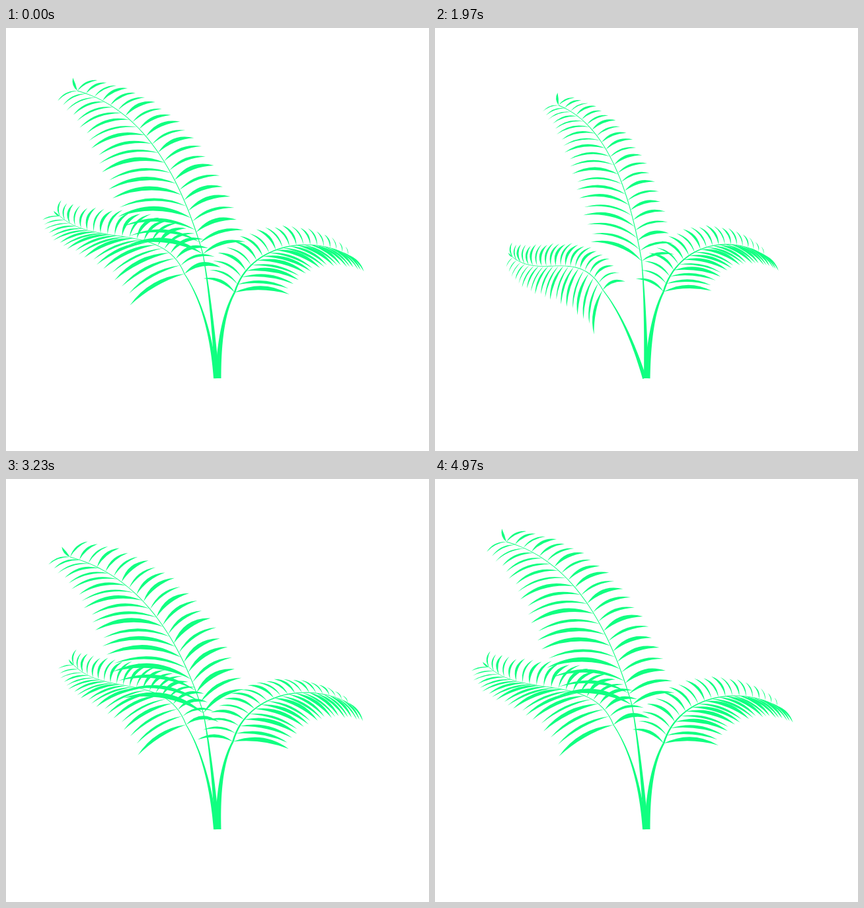
An HTML page with a canvas for the animation above (5.01 s loop, 640 px wide and 640 px high).

```html
<!DOCTYPE html>
<html lang="en">
<head>
<meta charset="utf-8">
<title>Palm in the wind</title>
<style>
html, body { margin: 0; width: 100%; height: 100%; overflow: hidden; background: #fff; }
canvas { display: block; width: 640px; height: 640px; }
</style>
</head>
<body>
<canvas id="stage" width="640" height="640"></canvas>
<script>
const ctx = document.getElementById('stage').getContext('2d');
const LOOP = 5010;
const GREEN = '#10ff80';
const KEYS = [0, 700, 1270, 1970, 2770, 3230, 3780, 4170, 4870];

// rib: four points of the leafy part at rest; stem: the bend below it.
// Leaf angles (degrees) and lengths run from the crown to the tip.
// gusts: where the wind takes the rib's second and last points, and how far
// (radians) it swings the leaves of sides a and b.
const fronds = [
  { // low left
    base: [317, 530], stem: [308, 430], width: [6, 1.1, 0.7], turn: 1, spring: 0.95,
    rib: [[270, 372], [219, 325], [147, 311], [82, 285]],
    a: { n: 21, angle: [-10, -86], length: [54, 24], bow: [0.24, 0.42] },
    b: { n: 20, angle: [150, 169], length: [92, 28], bow: [0.11, 0.21] },
    bud: [-140, 13],
    gusts: [
      [196, 378, 97, 373, 0.3, 0],
      [212, 362, 118, 347, 0.13, -0.45],
      [231, 329, 118, 291, 0.15, -0.15],
      [226, 324, 103, 282, 0.1, 0]
    ]
  },
  { // tall middle
    base: [319.5, 530], stem: [311, 415], width: [7, 1.2, 0.9], turn: 1, spring: -0.15,
    rib: [[298, 342], [260, 240], [199, 150], [108, 95]],
    a: { n: 22, angle: [-16, -28], length: [67, 33], bow: [0.16, 0.32] },
    b: { n: 20, angle: [187, 153], length: [110, 34], bow: [0.18, 0.28] },
    bud: [-109, 21],
    gusts: [
      [285, 251, 178, 110, 0.27, 0.05],
      [290, 256, 187, 117, 0.13, 0.18],
      [263, 266, 108, 130, -0.55, 0.25],
      [259, 258, 97, 118, -0.32, 0.05]
    ]
  },
  { // right
    base: [321, 530], stem: [323, 440], width: [9, 2.6, 0.7], turn: -1, spring: -0.15,
    rib: [[346, 400], [386, 347], [450, 328], [517, 343]],
    a: { n: 20, angle: [-156, -106], length: [50, 13], bow: [0.18, 0.32] },
    b: { n: 20, angle: [2, 46], length: [80, 36], bow: [0.12, 0.24] },
    bud: [60, 3],
    gusts: [
      [395, 360, 511, 365, -0.15, 0.15],
      [382, 346, 497, 343, -0.05, -0.07],
      [378, 339, 512, 329, -0.55, 0.1],
      [383, 343, 517, 338, -0.35, 0.1]
    ]
  }
];

const lerp = (a, b, k) => a + (b - a) * k;
const mix = (p, q, k) => p.map((v, i) => lerp(v, q[i], k));

// Each frond springs past rest (or stops short of it) and settles.
for (const f of fronds) {
  const rest = [...f.rib[1], ...f.rib[3], 0, 0];
  const back = f.gusts[3];
  const settle = k => mix(back, rest, 1 + f.spring * k);
  f.keys = [rest, settle(0.3), ...f.gusts, settle(1), settle(0.16), rest];
}

// Periodic monotone cubic between the key poses.
function poseAt(keys, t) {
  const n = keys.length;
  const time = k => KEYS[(k + n) % n] + LOOP * Math.floor(k / n);
  const val = (k, i) => keys[(k + n) % n][i];
  const slope = (k, i) => (val(k + 1, i) - val(k, i)) / (time(k + 1) - time(k));
  const tangent = (k, i) => {
    const p = slope(k - 1, i), q = slope(k, i);
    return p * q > 0 ? 2 * p * q / (p + q) : 0;
  };
  let k = n - 1;
  while (KEYS[k] > t) k--;
  const h = time(k + 1) - time(k), u = (t - time(k)) / h;
  const ease = u * u * (3 - 2 * u);
  return keys[k].map((v, i) => lerp(v, val(k + 1, i), ease)
    + h * u * (1 - u) * ((1 - u) * tangent(k, i) - u * tangent(k + 1, i)));
}

// Linear map, fixed at the base, that carries the two rib handles to the pose.
function warp({ base: [bx, by], rib }, pose) {
  const x1 = rib[1][0] - bx, y1 = rib[1][1] - by;
  const x2 = rib[3][0] - bx, y2 = rib[3][1] - by;
  const det = x1 * y2 - x2 * y1;
  const row = (p, q) => [(p * y2 - q * y1) / det, (x1 * q - x2 * p) / det];
  const [a, b] = row(pose[0] - bx, pose[2] - bx);
  const [c, d] = row(pose[1] - by, pose[3] - by);
  return (x, y) => [a * x + b * y, c * x + d * y];
}

// Cubic through four evenly spaced points.
function along(points, u) {
  const t = 3 * u, a = t - 1, b = t - 2, c = t - 3;
  const w = [-a * b * c / 6, t * b * c / 2, -t * a * c / 2, t * a * b / 6];
  return [0, 1].map(j => points.reduce((sum, p, i) => sum + w[i] * p[j], 0));
}

function leaf([x, y], [dx, dy], inner, outer) {
  const mx = x + dx / 2, my = y + dy / 2;
  ctx.beginPath();
  ctx.moveTo(x, y);
  ctx.quadraticCurveTo(mx + dy * outer, my - dx * outer, x + dx, y + dy);
  ctx.quadraticCurveTo(mx + dy * inner, my - dx * inner, x, y);
  ctx.fill();
}

function ribbon(points, w0, w1) {
  const left = [], right = [], last = points.length - 1;
  points.forEach(([x, y], i) => {
    const p = points[Math.max(0, i - 1)], q = points[Math.min(last, i + 1)];
    const dx = q[0] - p[0], dy = q[1] - p[1];
    const k = lerp(w1, w0, (1 - i / last) ** 1.4) / 2 / Math.hypot(dx, dy);
    left.push([x + dy * k, y - dx * k]);
    right.unshift([x - dy * k, y + dx * k]);
  });
  ctx.beginPath();
  left.concat(right).forEach(([x, y]) => ctx.lineTo(x, y));
  ctx.fill();
}

function blade(map, degrees, length, swing) {
  const r = degrees * Math.PI / 180, c = Math.cos(swing), s = Math.sin(swing);
  const [x, y] = map(length * Math.cos(r), length * Math.sin(r));
  return [x * c - y * s, x * s + y * c];
}

function leaves(rib, map, { n, angle, length, bow }, swing, turn) {
  for (let i = 0; i < n; i++) {
    const x = i / (n - 1), u = x * (1.15 - 0.15 * x);
    const size = lerp(length[0], length[1], u * u) * (1 + 0.04 * Math.sin(i * 4.1 + n));
    const outer = lerp(bow[0], bow[1], 1 + 0.25 * Math.sin(i * 2.4 + n));
    leaf(along(rib, u), blade(map, lerp(...angle, u), size, swing), turn * bow[0], turn * outer);
  }
}

function drawFrond(f, t) {
  const pose = poseAt(f.keys, t), swingA = pose[4], swingB = pose[5];
  const map = warp(f, pose), [bx, by] = f.base, [w0, w1, w2] = f.width;
  const place = ([x, y]) => {
    const [px, py] = map(x - bx, y - by);
    return [bx + px, by + py];
  };
  const rib = f.rib.map(place), bend = place(f.stem);
  const steps = Array.from({ length: 31 }, (_, i) => i / 30);
  ribbon(steps.map(u => mix(mix(f.base, bend, u), mix(bend, rib[0], u), u)), w0, w1);
  ribbon(steps.map(u => along(rib, u)), w1, w2);
  leaves(rib, map, f.a, swingA, f.turn);
  leaves(rib, map, f.b, swingB, -f.turn);
  leaf(rib[3], blade(map, ...f.bud, swingA), -0.06 * f.turn, 0.32 * f.turn);
}

function draw(now) {
  ctx.fillStyle = '#fff';
  ctx.fillRect(0, 0, 640, 640);
  ctx.fillStyle = GREEN;
  for (const f of fronds) drawFrond(f, now % LOOP);
}

let start;
function tick(now) {
  if (start === undefined) start = now;
  draw(Math.max(0, now - start));
  requestAnimationFrame(tick);
}
draw(0);
requestAnimationFrame(tick);
</script>
</body>
</html>
```
